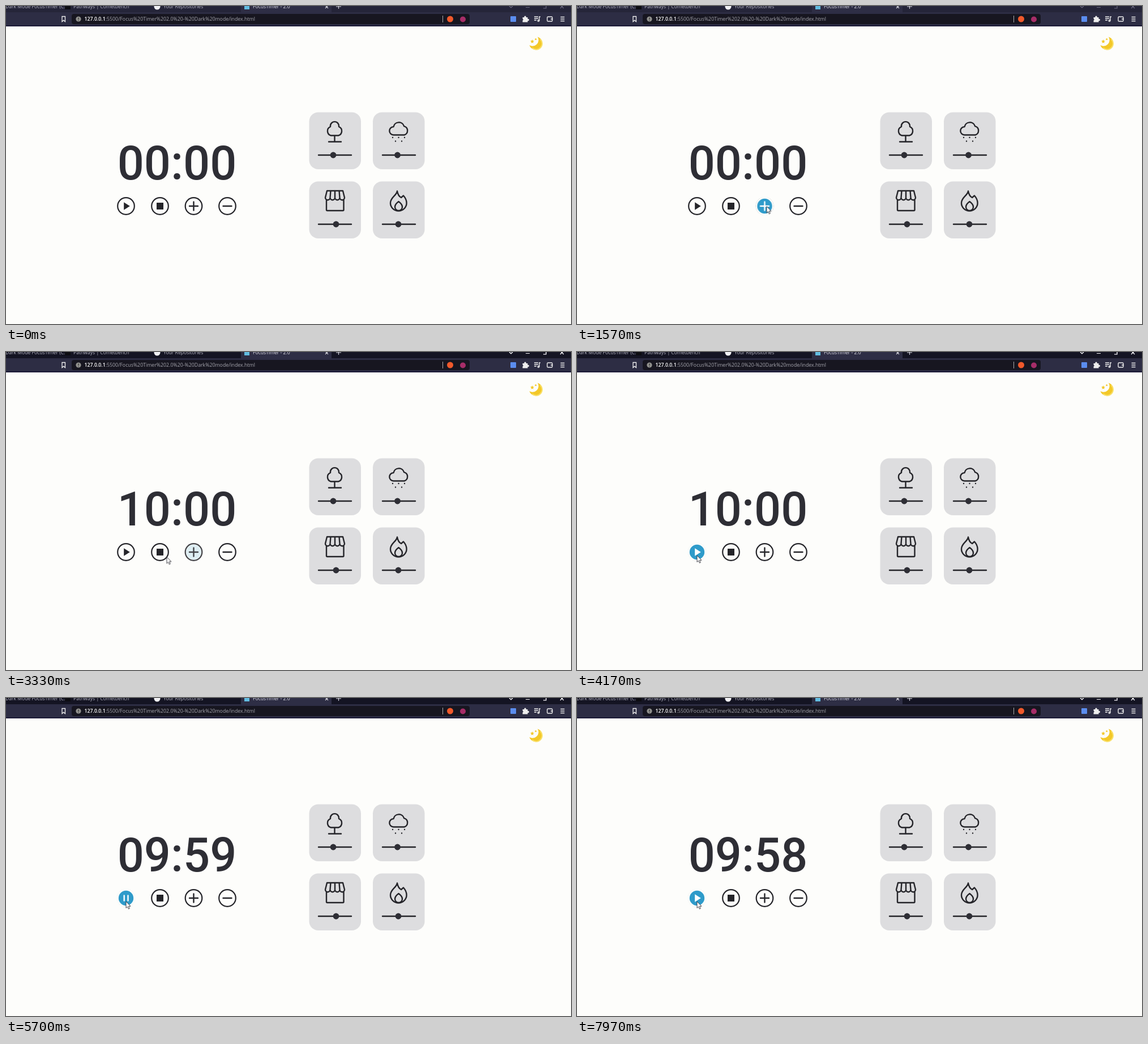
Write an HTML page that moves like this. It is 998x561 px and loops after 8 s.

```html
<!DOCTYPE html>
<html lang="en">
<head>
<meta charset="utf-8">
<title>FocusTimer - 2.0</title>
<style>
  html, body { margin: 0; width: 100%; height: 100%; overflow: hidden; background: #fdfdfb; }
  svg { position: absolute; left: 0; top: 0; }
  text { font-family: "Open Sans", "Noto Sans", sans-serif; font-size: 8.6px; }
  .address { font-size: 8.78px; }
  .ink { color: #242429; }
  .white { color: #fff; }
  .line { fill: none; stroke: currentColor; stroke-width: 2.4; stroke-linecap: round; stroke-linejoin: round; }
  .fill { fill: currentColor; }

  .clock {
    position: absolute; left: 152px; top: 228px; width: 300px; height: 100px; overflow: hidden;
    font: 500 83px/100px Roboto, sans-serif; color: #2e2e35; text-align: center;
  }
  .clock div { animation: count 8s step-end infinite; }

  .active { animation: focus 8s step-end infinite; }
  .add-hover { animation: add-hover 8s linear infinite; }
  .play-hover { animation: play-hover 8s linear infinite; }
  .play { animation: play 8s step-end infinite; }
  .pause { animation: pause 8s step-end infinite; }
  .pointer { animation: move 8s ease-in-out infinite, appear 8s step-end infinite; }

  @keyframes count {
    0% { transform: translateY(0); }
    22.25% { transform: translateY(-100px); }
    27.5% { transform: translateY(-200px); }
    68.75% { transform: translateY(-300px); }
    82.5%, 100% { transform: translateY(-400px); }
  }
  @keyframes focus { 0% { opacity: 0; } 20.5%, 100% { opacity: 1; } }
  @keyframes add-hover {
    0%, 10.6% { opacity: 0; }
    14.4%, 38.5% { opacity: 1; }
    42.2%, 100% { opacity: 0; }
  }
  @keyframes play-hover {
    0%, 45% { opacity: 0; }
    48.75%, 57.5% { opacity: 1; }
    57.51% { opacity: 0; }
    61.2%, 90.6% { opacity: 1; }
    90.61% { opacity: 0; }
    94.4%, 100% { opacity: 1; }
  }
  @keyframes play { 0% { opacity: 1; } 57.5% { opacity: 0; } 90.6%, 100% { opacity: 1; } }
  @keyframes pause { 0% { opacity: 0; } 57.5% { opacity: 1; } 90.6%, 100% { opacity: 0; } }
  @keyframes appear { 0% { opacity: 0; } 12.9%, 100% { opacity: 1; } }
  @keyframes move {
    0%, 27.5% { transform: translate(335px, 353.5px); }
    33%, 38% { transform: translate(333.5px, 353px); animation-timing-function: ease-in; }
    42.5% { transform: translate(263px, 365px); animation-timing-function: linear; }
    45% { transform: translate(222px, 363px); animation-timing-function: ease-out; }
    48.75%, 100% { transform: translate(212px, 359px); }
  }
</style>
</head>
<body>
<svg width="998" height="561" viewBox="0 0 998 561">
  <defs>
    <circle id="ring" r="14.8" fill="none" stroke="currentColor" stroke-width="2.2"/>
    <path id="play" class="fill" d="M-3.8-6.8 6.8 0-3.8 6.8z"/>
    <path id="pause" class="line" d="M-3.3-4.5v9M3.5-4.5v9"/>
    <path id="plus" class="line" d="M-7.5 0h15M0-7.5v15"/>
    <g id="hover">
      <circle r="14" fill="#2f9bca"/>
      <circle r="14.8" fill="none" stroke="#fdfdfb" stroke-width="3.2"/>
    </g>
    <path id="slider" class="line" d="M0 0h58"/>
    <rect id="card" width="91.5" height="100.5" rx="16"/>
    <path id="controls" d="M889 0l3 3 3-3M918 2.5h7M949 4h5v-5M979-2l6 6m0-6l-6 6"/>
  </defs>

  <!-- browser bar -->
  <rect width="998" height="36" fill="#2d2d44"/>
  <rect width="998" height="11" fill="#252539"/>
  <rect class="active" width="998" height="11" fill="#141423"/>
  <rect x="415" width="160" height="12" fill="#2e2e45"/>
  <rect y="34" width="998" height="2" fill="#1d1b38"/>
  <g fill="#b5b5c2">
    <text x="-1" y="4">Dark Mode FocusTimer (C..</text>
    <text x="119" y="4">Pathways | Cometbench</text>
    <text x="278" y="4">Your Repositories</text>
  </g>
  <text x="436" y="4" fill="#e3e3ea">FocusTimer - 2.0</text>
  <rect x="104" width="10" height="6" fill="#0d0d12"/>
  <circle cx="267" cy="1" r="5.5" fill="#f1f1f4"/>
  <rect x="421" width="9" height="6" fill="#62bce0"/>
  <g fill="none" stroke-width="1.2">
    <path d="M564-1l5 5m0-5l-5 5M583 1h9m-4.5-4v8" stroke="#d5d5de"/>
    <use href="#controls" stroke="#6c6b80"/>
    <use class="active" href="#controls" stroke="#fff"/>
  </g>
  <path d="M99 18.5h5.5v9l-2.75-2.3-2.75 2.3z" fill="none" stroke="#eee" stroke-width="1.3"/>
  <rect x="116" y="14" width="703" height="18" rx="4" fill="#171620"/>
  <circle cx="128" cy="23" r="4.6" fill="#92928f"/>
  <path d="M128 20.5v3m0 1.2v1" stroke="#222" stroke-width="1.2"/>
  <text class="address" x="138.5" y="26" fill="#a5a5ad"><tspan fill="#fff" font-weight="600">127.0.0.1</tspan>:5500/Focus%20Timer%202.0%20-%20Dark%20mode/index.html</text>
  <path d="M771.5 17v12" stroke="#aaa"/>
  <circle cx="784.5" cy="23" r="5.5" fill="#f1592b"/>
  <circle cx="807" cy="23.5" r="5" fill="#a72d68"/>
  <rect x="891" y="18" width="10" height="10" rx="1" fill="#5b8def"/>
  <path d="M912.5 20h3a1.7 1.7 0 1 1 3 0h3v3a1.7 1.7 0 1 1 0 3v2.5h-9v-3a1.6 1.6 0 0 0 0-3z" fill="#eee"/>
  <g fill="none" stroke="#eee" stroke-width="1.4">
    <path d="M933 19h7M933 22h7M933 25h4M942 26v-7h2"/>
    <circle cx="940.5" cy="26" r="1.3"/>
    <rect x="956" y="19" width="9" height="8" rx="1.5"/>
    <path d="M966 23h-4M979.5 19.5h7M979.5 23h7M979.5 26.5h7"/>
  </g>

  <!-- theme switch -->
  <path d="M939 54.5a11.6 11.6 0 1 1-14.500 14.500 10.500 10.500 0 0 0 14.500-14.500z" fill="#f3c828"/>
  <path d="M943.500 58.500a10 10 0 0 1-14 15.500" fill="none" stroke="#f9df66" stroke-width="2"/>
  <path id="star" d="M929.5 59l1 2.200 2.400.3-1.800 1.700.5 2.400-2.100-1.200-2.100 1.200.5-2.400-1.800-1.700 2.400-.3z" fill="#f3c828"/>
  <use href="#star" transform="translate(378 21) scale(.6)"/>

  <!-- sound cards -->
  <g fill="#dddddf">
    <use href="#card" x="535.5" y="187.5"/>
    <use href="#card" x="648" y="187.5"/>
    <use href="#card" x="535.5" y="309.5"/>
    <use href="#card" x="648" y="309.5"/>
  </g>
  <g class="ink">
    <use href="#slider" x="552" y="263"/>
    <use href="#slider" x="665" y="263"/>
    <use href="#slider" x="552" y="385"/>
    <use href="#slider" x="665" y="385"/>
    <g fill="#2e2e35">
      <circle cx="578" cy="263" r="5.4"/>
      <circle cx="691.5" cy="263" r="5.4"/>
      <circle cx="583" cy="385" r="5.4"/>
      <circle cx="693" cy="385" r="5.4"/>
    </g>
    <g class="line">
      <path d="M573 213a7.6 7.6 0 1 1 15 0a8.2 8.2 0 0 1-1 15.500h-13a8.2 8.2 0 0 1-1-15.500zM580.5 228.500v11M570 239.500h22"/>
      <path d="M684.5 227.500a7.2 7.2 0 0 1 0-14.400a9.6 9.6 0 0 1 18.600-1a8 8 0 0 1 .4 15.400z"/>
      <path d="M683 232h0M693.5 232h0M704 232h0M688 238.500h0M699 238.500h0"/>
      <path d="M566 342v17.500q0 1.500 1.500 1.500h27.500q1.500 0 1.500-1.500v-17.500M564 338l3-12h28l3 12a4.250 4.250 0 0 1-8.500 0a4.250 4.250 0 0 1-8.500 0a4.250 4.250 0 0 1-8.500 0a4.250 4.250 0 0 1-8.500 0M573.500 326l-1 12M581 326v12M588.500 326l1 12"/>
      <path d="M691 326.500c-1 8-12 11-12 21a14.300 14 0 0 0 28.600 0c0-5-2-9-5.600-13l-4 3.500c-4-2-6-6-7-11.500zM693.500 345q6.500 4.500 6.500 9.500a6.500 6.500 0 0 1-13 0q0-5 6.500-9.500z"/>
    </g>
  </g>

  <!-- timer buttons -->
  <g class="ink">
    <g transform="translate(212 353)">
      <use href="#ring"/>
      <use class="play" href="#play"/>
      <use class="pause" href="#pause"/>
      <g class="white play-hover">
        <use href="#hover"/>
        <use class="play" href="#play"/>
        <use class="pause" href="#pause"/>
      </g>
    </g>
    <g transform="translate(272 353)">
      <use href="#ring"/>
      <rect class="fill" x="-6" y="-6" width="12" height="12"/>
    </g>
    <g transform="translate(331.5 353)">
      <use href="#ring"/>
      <use href="#plus"/>
      <g class="white add-hover">
        <use href="#hover"/>
        <use href="#plus"/>
      </g>
    </g>
    <g transform="translate(391 353)">
      <use href="#ring"/>
      <path class="line" d="M-7.5 0h15"/>
    </g>
  </g>
</svg>
<div class="clock"><div>00:00<br>05:00<br>10:00<br>09:59<br>09:58</div></div>
<svg width="998" height="561">
  <path class="pointer" d="M0 0v11.500l2.600-2.400 1.800 4.100 1.900-.9-1.800-4h3.500z" fill="#fff" stroke="#33333a" stroke-width=".9"/>
</svg>
</body>
</html>
```
